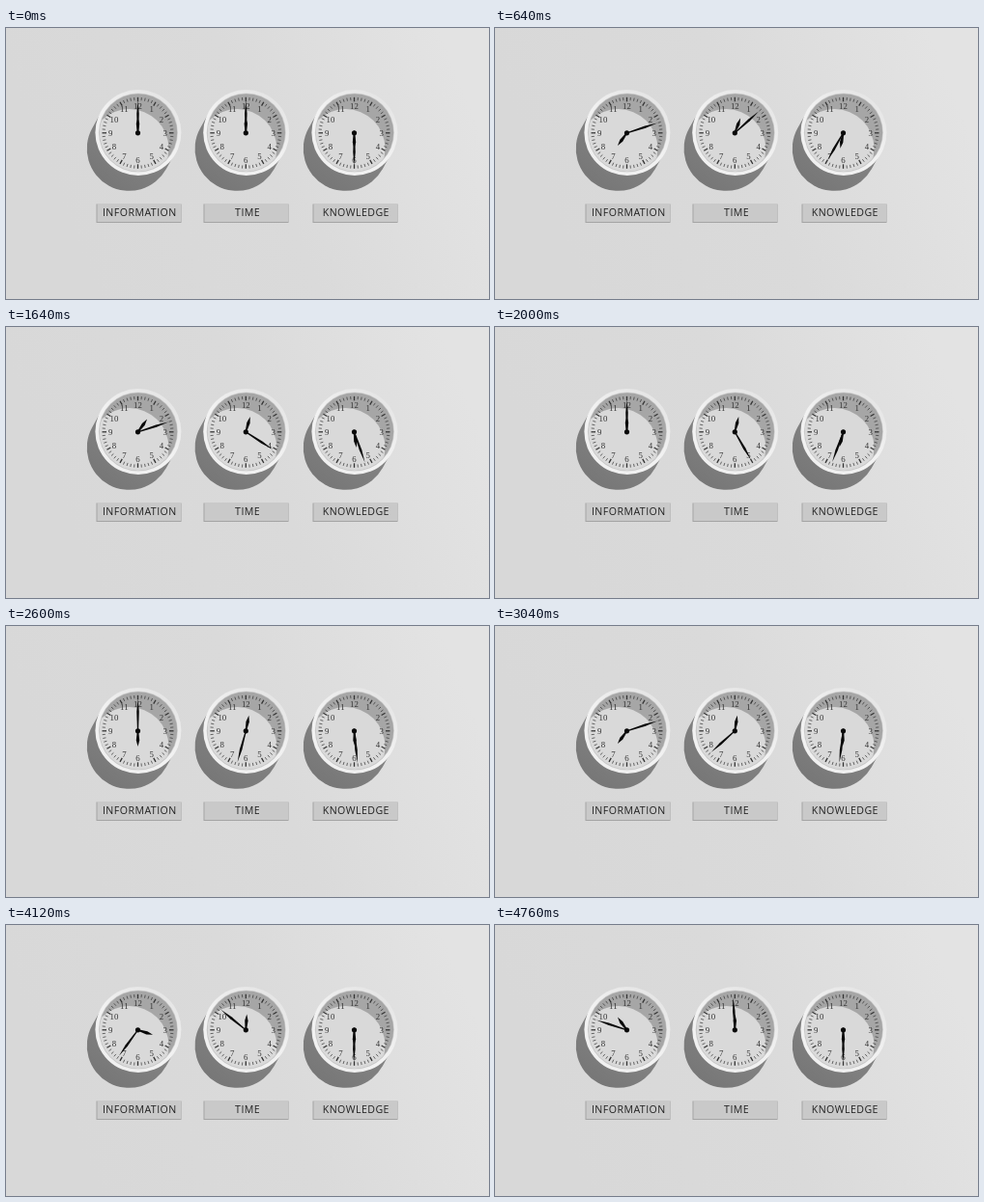
These frames come from a looping animation (500x281 px, 4800 ms). An HTML page with a canvas:

```html
<!DOCTYPE html>
<html lang="en">
<head>
<meta charset="utf-8">
<title>Three clocks</title>
<style>
  html, body { margin: 0; width: 100%; height: 100%; overflow: hidden; background: #dadada; }
  canvas { display: block; }
</style>
</head>
<body>
<canvas id="stage" width="500" height="281"></canvas>
<script>
const ctx = document.getElementById('stage').getContext('2d');
const LOOP = 4800, STEP = 40, FRAMES = LOOP / STEP;
const CENTER_Y = 108.8, TAU = Math.PI * 2;
const SHADOW = [-9, 16.3];
const rad = degrees => degrees * Math.PI / 180;

// Swing of the third clock around six o'clock: [ms, degrees]
const minuteSwing = [[0, 0], [240, -17], [820, 44], [1460, -33], [2000, 20],
  [2440, -16], [2840, 13], [3420, -9], [3800, 4], [4200, 0], [LOOP, 0]];
const hourSwing = [[0, 0], [240, -9], [880, 20], [1400, -20], [2000, 14],
  [2440, -8], [2840, 6], [3420, -5], [3800, 2], [4200, 0], [LOOP, 0]];

function ease(keys, t) {
  const next = keys.findIndex(key => key[0] > t);
  const [t0, a] = keys[next - 1], [t1, b] = keys[next];
  const p = (t - t0) / (t1 - t0);
  return a + (b - a) * p * p * (3 - 2 * p);
}

// Each pose gives the hour and minute angles for a step of the loop
const clocks = [
  { x: 136.5, label: 'INFORMATION', pose: n => [n * 36, n * 72] },
  { x: 248.3, label: 'TIME', pose: n => [(24 - n * 0.2) % 24, n * 3] },
  { x: 360.5, label: 'KNOWLEDGE',
    pose: n => [180 + ease(hourSwing, n * STEP), 180 + ease(minuteSwing, n * STEP)] }
];

function gradient(x0, y0, x1, y1, ...colors) {
  const g = ctx.createLinearGradient(x0, y0, x1, y1);
  colors.forEach((c, i) => g.addColorStop(i / (colors.length - 1), c));
  return g;
}

function disc(x, y, r, fill) {
  ctx.fillStyle = fill;
  ctx.beginPath();
  ctx.arc(x, y, r, 0, TAU);
  ctx.fill();
}

function drawCase() {
  ctx.lineCap = 'round';
  ctx.lineWidth = 87.5;
  ctx.strokeStyle = gradient(-30, 55, 15, -10, '#777', '#888');
  ctx.beginPath();
  ctx.moveTo(0, 0);
  ctx.lineTo(...SHADOW);
  ctx.stroke();

  disc(0.4, -0.3, 44.5, gradient(25, -36, -25, 38, '#e6e6e6', '#f2f2f2', '#f0f0f0'));
  disc(0.4, -0.3, 41, '#cecece');
  ctx.save();
  ctx.beginPath();
  ctx.arc(0.4, -0.2, 40.3, 0, TAU);
  ctx.clip();
  disc(0, 0, 42, '#a6a6a6');
  disc(...SHADOW, 41, '#d9d9d9');
  ctx.restore();
}

function drawDial() {
  ctx.strokeStyle = '#333';
  ctx.lineCap = 'butt';
  for (let i = 0; i < 60; i++) {
    const major = i % 5 === 0, a = rad(i * 6);
    const inner = major ? 32.5 : 33.8;
    ctx.lineWidth = major ? 1.3 : 0.7;
    ctx.beginPath();
    ctx.moveTo(Math.sin(a) * inner, -Math.cos(a) * inner);
    ctx.lineTo(Math.sin(a) * 37, -Math.cos(a) * 37);
    ctx.stroke();
  }
  ctx.fillStyle = '#333';
  ctx.font = '8.8px "Liberation Serif", serif';
  for (let i = 1; i <= 12; i++) {
    const a = rad(i * 30);
    ctx.fillText(i, Math.sin(a) * 28.3, 0.7 - Math.cos(a) * 28.3);
  }
}

function drawHand(angle, length, width) {
  ctx.save();
  ctx.rotate(rad(angle));
  ctx.beginPath();
  ctx.moveTo(-0.5, 2);
  ctx.lineTo(-width / 2, -length * 0.6);
  ctx.lineTo(0, -length);
  ctx.lineTo(width / 2, -length * 0.6);
  ctx.lineTo(0.5, 2);
  ctx.fill();
  ctx.restore();
}

function drawPlate(x, label) {
  const left = Math.round(x - 43), top = 182;
  ctx.fillStyle = '#a4a4a4';
  ctx.fillRect(left - 0.5, top + 0.5, 88, 19.5);
  ctx.fillStyle = '#c9c9c9';
  ctx.fillRect(left + 0.5, top, 86.5, 19);
  ctx.fillStyle = '#222';
  ctx.font = '10.6px "Open Sans", sans-serif';
  ctx.letterSpacing = '0.45px';
  ctx.fillText(label, x + 1.8, 191.8);
  ctx.letterSpacing = '0px';
}

function draw(n) {
  ctx.textAlign = 'center';
  ctx.textBaseline = 'middle';
  ctx.fillStyle = gradient(60, 190, 460, 30, '#d8d8d8', '#dadada', '#e3e3e3');
  ctx.fillRect(0, 0, 500, 281);

  for (const { x, label, pose } of clocks) {
    const [hour, minute] = pose(n);
    drawPlate(x, label);
    ctx.save();
    ctx.translate(x, CENTER_Y);
    drawCase();
    drawDial();
    ctx.fillStyle = '#080808';
    drawHand(hour, 16.3, 3.4);
    drawHand(minute, 33.3, 2.5);
    disc(0, 0, 2.6, '#080808');
    ctx.restore();
  }
}

const start = performance.now();
function tick() {
  draw(Math.floor((performance.now() - start) / STEP) % FRAMES);
  requestAnimationFrame(tick);
}
tick();
</script>
</body>
</html>
```
